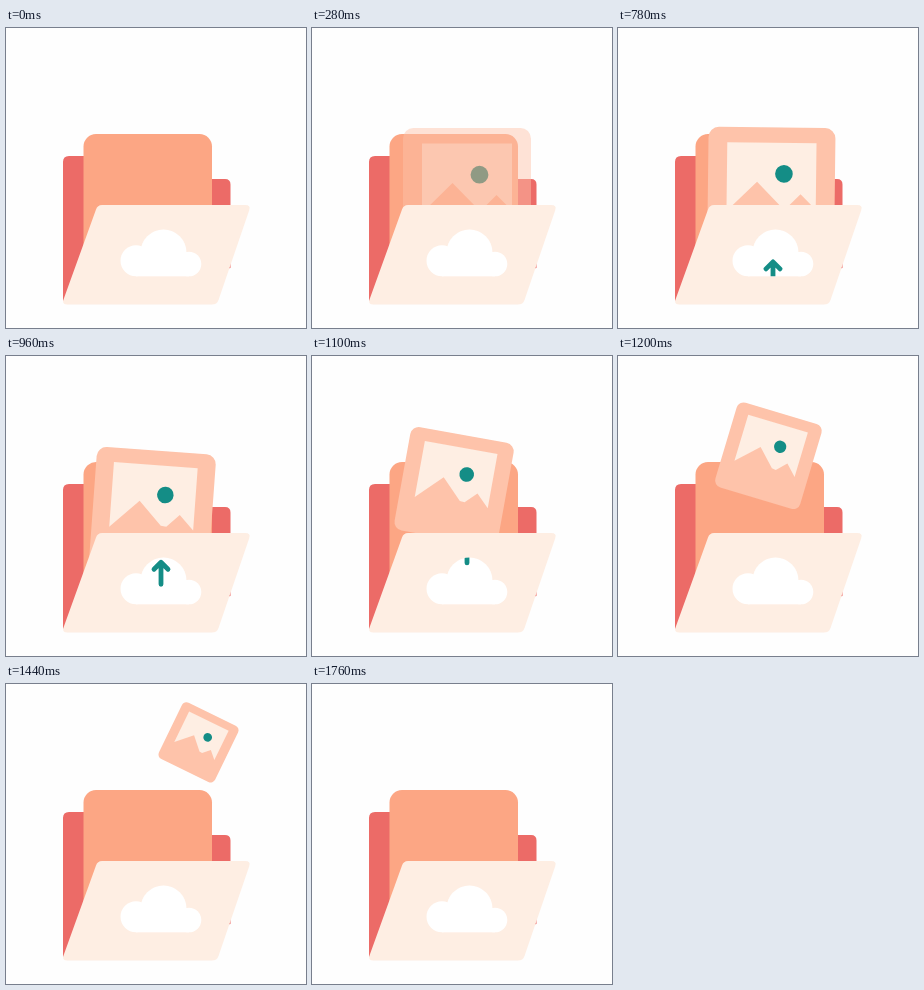
An HTML page for the animation above (1.82 s loop, 300 by 300 pixels).

```html
<!DOCTYPE html>
<html lang="en">
<head>
<meta charset="utf-8">
<title>Cloud folder upload</title>
<style>
  html, body { margin: 0; width: 100%; height: 100%; overflow: hidden; background: #fefefe; }
  svg { display: block; width: 100%; height: 100%; }
</style>
</head>
<body>
<svg viewBox="0 0 300 300">
  <defs>
    <g id="cloudShape">
      <circle cx="157.5" cy="224.5" r="23"/>
      <circle cx="130" cy="232.8" r="15.5"/>
      <circle cx="183" cy="236" r="12.3"/>
      <rect x="130" y="228" width="53" height="20.3"/>
    </g>
    <clipPath id="cloudClip">
      <circle cx="157.5" cy="224.5" r="23"/>
      <circle cx="130" cy="232.8" r="15.5"/>
      <circle cx="183" cy="236" r="12.3"/>
      <rect x="130" y="228" width="53" height="20.3"/>
    </clipPath>
  </defs>

  <path fill="#ec6b67" d="M57 272V134Q57 128 63 128H120V151H219Q224.500 151 224.500 156.500V240L61 276Z"/>
  <rect x="77.500" y="106" width="128.500" height="150" rx="12.500" fill="#fca684"/>

  <g id="photo">
    <rect x="-64" y="-64" width="128" height="128" rx="10.500" fill="#fec3aa"/>
    <path fill="#feeee3" d="M-45 -48.500H45V18.500L29.500 3L16 16.500L10 16L-14.500 -9L-45 21Z"/>
    <circle cx="12.500" cy="-17.300" r="8.900" fill="#148d86"/>
  </g>

  <path fill="#feeee3" d="M96 177H239Q245 177 243.300 182L212.500 272Q211 276.500 206 276.500H61Q56 276.500 57.500 271.500L90 181.500Q91.500 177 96 177Z"/>
  <use href="#cloudShape" fill="#fff"/>
  <g clip-path="url(#cloudClip)">
    <path id="arrow" d="M-7 7L0 0L7 7M0 1V22" fill="none" stroke="#148d86"
          stroke-width="4.800" stroke-linecap="round" stroke-linejoin="round"/>
  </g>
</svg>
<script>
  const LOOP = 1820;
  const photo = document.getElementById('photo');
  const arrow = document.getElementById('arrow');

  const progress = (t, from, to) => Math.min(1, Math.max(0, (t - from) / (to - from)));
  const ease = u => u < 0.5 ? 4 * u ** 3 : 1 - 4 * (1 - u) ** 3;
  const bezier = (p, a, b, c, d) => {
    const q = 1 - p;
    return q ** 3 * a + 3 * p * q * q * b + 3 * p * p * q * c + p ** 3 * d;
  };

  function draw(t) {
    const p = ease(progress(t, 560, 1760));
    const shrink = ease(progress(t, 600, 1760));
    const x = bezier(p, 155, 132, 134, 208);
    const y = bezier(p, 164, 149.7, 79.8, 51.3);
    const scale = 1 - 0.558 * shrink;
    photo.setAttribute('transform', `translate(${x} ${y}) rotate(${28 * p}) scale(${scale})`);
    photo.setAttribute('opacity', progress(t, 40, 560) * (1 - progress(t, 1460, 1700)));

    // The arrow rises steadily, visible only inside the cloud.
    arrow.setAttribute('transform', `translate(155 ${234 - 0.153 * (t - 780)})`);
  }

  const start = performance.now();
  function tick() {
    draw((performance.now() - start) % LOOP);
    requestAnimationFrame(tick);
  }
  draw(0);
  requestAnimationFrame(tick);
</script>
</body>
</html>
```
